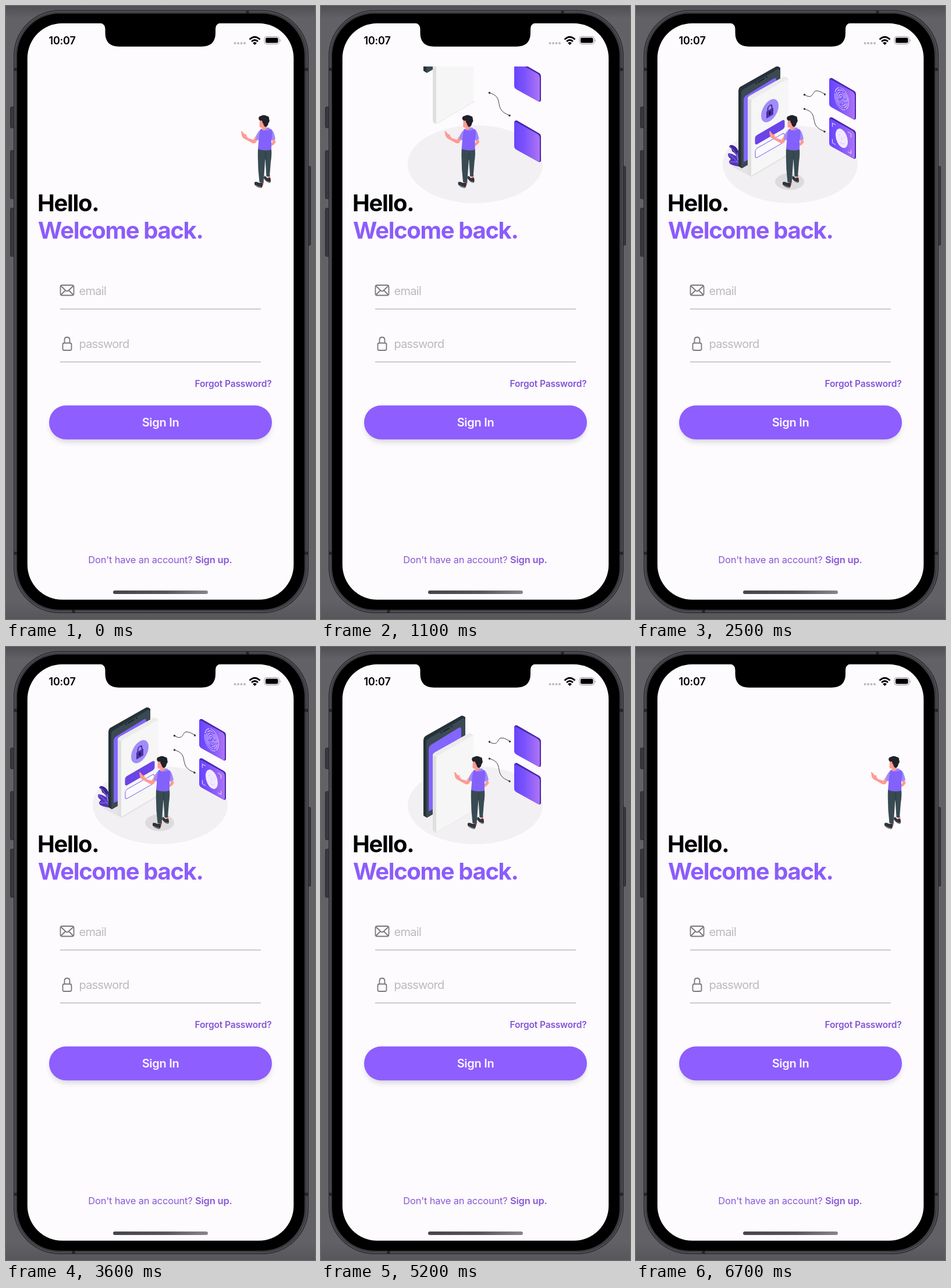
These frames come from a looping animation (531x1054 px, 6800 ms). An HTML page:

```html
<!DOCTYPE html>
<html lang="en">
<head>
<meta charset="utf-8">
<title>Sign in</title>
<style>
  html, body { margin: 0; width: 100%; height: 100%; overflow: hidden; background: #626166; }
  svg { display: block; width: 531px; height: 1054px; }
  text { font-family: Inter, "Open Sans", sans-serif; }
  .line { fill: none; stroke-linecap: round; stroke-linejoin: round; }
  .round { stroke-linejoin: round; stroke-width: 2; }
</style>
</head>
<body>
<svg viewBox="0 0 531 1054">
  <defs>
    <linearGradient id="backdrop" x2="0" y2="1">
      <stop stop-color="#504f53"/><stop offset=".02" stop-color="#626166"/>
      <stop offset=".97" stop-color="#626166"/><stop offset="1" stop-color="#57565a"/>
    </linearGradient>
    <linearGradient id="violet">
      <stop stop-color="#6943ff"/><stop offset=".4" stop-color="#7b53fc"/><stop offset="1" stop-color="#ae74f4"/>
    </linearGradient>
    <linearGradient id="indicator">
      <stop stop-color="#474449"/><stop offset=".55" stop-color="#58555a"/><stop offset="1" stop-color="#89868b"/>
    </linearGradient>
    <filter id="soft" x="-10%" y="-40%" width="120%" height="200%"><feGaussianBlur stdDeviation="5"/></filter>
    <clipPath id="scene"><rect x="37" y="104" width="457" height="250"/></clipPath>
    <path id="cardFace" d="M332 129Q332 125 336 127L372 147Q376 150 376 154V192Q376 196 372 194L336 174Q332 172 332 168Z"/>
    <clipPath id="cardClip"><use href="#cardFace"/></clipPath>
    <clipPath id="panelClip"><path d="M198 160L262 124V255L198 292Z"/></clipPath>
    <g id="card">
      <path d="M332 127Q333 123 337 124L375 146Q378 148 378 152V192Q378 196 374 195L336 174Z" fill="#4728ad"/>
      <use href="#cardFace" fill="url(#violet)"/>
    </g>
  </defs>

  <!-- device -->
  <rect width="531" height="1054" fill="url(#backdrop)"/>
  <g fill="#38373b" stroke="#29282c">
    <rect x="7.500" y="173.500" width="8" height="36" rx="2"/>
    <rect x="7.500" y="248.500" width="8" height="83" rx="2"/>
    <rect x="7.500" y="347.500" width="8" height="83" rx="2"/>
    <rect x="516.500" y="275.500" width="7" height="136" rx="2"/>
  </g>
  <rect x="13.500" y="7.500" width="506" height="1036" rx="78" fill="#3c3b40" stroke="#2a292d"/>
  <rect x="15.500" y="9.500" width="502" height="1032" rx="76" fill="none" stroke="#5d5c62"/>
  <path d="M14 109h6M513 109h6M14 941h6M513 941h6M415 8v5M116 1038v5" stroke="#242327" stroke-width="5"/>
  <rect x="19" y="13" width="494" height="1025" rx="73"/>
  <rect x="36.800" y="29.700" width="457.500" height="991" rx="60" fill="#fdfbfe"/>
  <path d="M162 29Q170.500 31 170.500 40V46Q170.500 69.700 194 69.700H336Q360 69.700 360 46V40Q360 31 368 29Z"/>

  <!-- status bar -->
  <text x="73.500" y="66" font-size="18" font-weight="600" letter-spacing="-.2">10:07</text>
  <g fill="#bbb9bd">
    <circle cx="393.500" cy="64" r="2"/><circle cx="399" cy="64" r="2"/>
    <circle cx="404.500" cy="64" r="2"/><circle cx="410" cy="64" r="2"/>
  </g>
  <path d="M418.500 57.500Q427.500 49 436.500 57.500M422 61Q427.500 56 433 61" fill="none" stroke="#000" stroke-width="2.700"/>
  <path d="M424 63.500Q427.500 60.500 431 63.500L427.500 67Z"/>
  <rect x="444" y="52.500" width="25.500" height="13" rx="4" fill="none" stroke="#98969b"/>
  <rect x="446" y="54.500" width="21.500" height="9" rx="2.300"/>
  <path d="M471 57Q473 59 471 62Z" fill="#98969b"/>

  <!-- illustration -->
  <g clip-path="url(#scene)">
    <ellipse id="floor" cx="265" cy="272" rx="116" ry="67" fill="#f2f0f3"/>
    <g id="shadows" fill="#dddbde">
      <path d="M166 277L181 270L262 250L268 253L199 294Z" fill="#e5e3e6"/>
      <ellipse cx="264" cy="302" rx="25" ry="14.500"/>
    </g>
    <g id="plant">
      <path d="M179 277Q181 252 171 242Q162 236 160 242Q165 245 165 250Q173 252 179 277Z" fill="#3f2599"/>
      <path d="M178 276Q159 274 160 267L163 263Q156 258 159 253Q166 254 172 258L176 250L180 260Z" fill="#5534bd"/>
      <path class="line" d="M162 242Q172 249 177 270M160 255Q172 263 178 274M162 268L174 268M174 253L175 264" stroke="#b9a5ff" stroke-width=".7"/>
    </g>
    <g id="phone">
      <path class="round" d="M177 147Q177 141 181 139L241 105Q244 104 247 107V240L182 278L177 275Z" fill="#263238" stroke="#263238"/>
      <path d="M181 149Q181 145 185 143L243 109Q248 107 248 112V240L181 279Z" fill="#3b4a52"/>
      <path d="M185 162Q185 157 189 154L236 125Q241 122 241 127V245L185 268Z" fill="#8266fd"/>
      <path class="line" d="M210 131L220 125M224 122.500L225 122M206 133L207 132.500" stroke="#17212a" stroke-width="2"/>
    </g>
    <g id="panel">
      <path d="M192 160Q192 156 196 154L253 122Q256 121 259 123Q262 125 262 129V255L199 292Q192 291 192 286Z" fill="#e0dfe0"/>
      <path d="M192 160Q192 156 196 154L253 122Q256 121 259 123L262 126L198 162Z" fill="#ececec"/>
      <path d="M198 166Q198 161 202 159L258 127Q262 125 262 130V251Q262 254 259 256L198 292Z" fill="#f6f6f6"/>
      <g clip-path="url(#panelClip)">
        <g id="lock">
          <circle r="15" transform="matrix(1 -.577 0 1.200 230 180)" fill="#a28cf9"/>
          <g transform="translate(230 181) skewY(-30)">
            <path d="M-3.500-2V-6Q-3.500-10 0-10T3.500-6V-2" fill="none" stroke="#3b2684" stroke-width="1.700"/>
            <rect x="-6" y="-3" width="12" height="12" rx="1" fill="#4a2fa8"/>
            <path d="M0 1V5" stroke="#15103a" stroke-width="2.200" stroke-linecap="round"/>
          </g>
        </g>
        <g id="buttons">
          <rect x="-25.500" y="-8" width="51" height="16" rx="4" transform="translate(230 217) skewY(-30)" fill="#6a44e6"/>
          <rect x="-25" y="-8" width="50" height="16" rx="4" transform="translate(230 240) skewY(-30)" fill="#fbfaff" stroke="#7650ee"/>
        </g>
      </g>
    </g>
    <g id="wireTop">
      <path class="line" d="M289 152.500C302 160 303 152 306 148S316 146 325 152" stroke="#37373c"/>
      <circle cx="289.500" cy="152.500" r="1.700" fill="#37373c"/><circle cx="324.500" cy="152" r="1.700" fill="#37373c"/>
    </g>
    <g id="wireLow">
      <path class="line" d="M289 177C318 184 293 206 325 216" stroke="#37373c"/>
      <circle cx="289.500" cy="177" r="1.700" fill="#37373c"/><circle cx="324" cy="216" r="1.700" fill="#37373c"/>
    </g>
    <g id="cardTop">
      <use href="#card"/>
      <g clip-path="url(#cardClip)"><g id="print" class="line" stroke="#d9cbff"/></g>
    </g>
    <g id="cardLow">
      <use href="#card" y="67.500"/>
      <g clip-path="url(#cardClip)" transform="translate(0 67.500)">
        <g id="face">
          <g transform="translate(353.500 160) skewY(30)">
            <ellipse rx="10.500" ry="15.500" fill="#f1eaff"/>
            <path class="line" d="M-16-11V-17H-11M11-17H16V-11M16 11V17H11M-11 17H-16V11" stroke="#e0d2ff" stroke-width="1.200"/>
            <path class="line" d="M-5-4H-3M4-4H6M0-2V3M-3 8Q1 10 4 7" stroke="#cdb9f3" stroke-width=".8"/>
          </g>
        </g>
      </g>
    </g>
    <g id="man">
      <path d="M282 229L288 231Q290 236 281 241L278 238L283 234Z" fill="#ff9a94"/>
      <path d="M262 302L268 302V307L263 308ZM274 291L279 290V298L275 298Z" fill="#f28f89"/>
      <path d="M258 246L281 246Q282 256 280 268L278 293L272.500 293L270.500 262L267.500 304L260.500 303Q257 275 258 246Z" fill="#394b52"/>
      <path d="M271 250L271 264" stroke="#2b3940"/>
      <path d="M252 303Q255 301 260 304L266 304Q267 310 264 313Q255 312 252 307ZM269 292Q272 293 274 296L279 295Q281 301 279 304Q272 304 268 296Z" fill="#30333a"/>
      <path class="line" d="M253 308Q258 311 264 312M269 298Q273 303 279 303" stroke="#c9c7cc" stroke-width=".8"/>
      <path d="M260 224L255 234Q252 238 247 235L236 229Q231 227 230 222L229 216Q231 215 235 221Q239 219 238 223L241 227L250 230L257 219Z" fill="#ff9a94"/>
      <path class="line" d="M230 216L234 221" stroke="#ff9a94" stroke-width="1.800"/>
      <path d="M262 213Q256 217 254 229Q258 232 262 230ZM280 212Q285 213 288 229Q284 232 279 230Z" fill="#a18afa"/>
      <path d="M262 212Q270 208 281 212Q284 218 281 232V247Q270 250 258 246Q259 234 260 222Z" fill="#8262fb"/>
      <path d="M265 213Q271 216 279 212L277 209L267 209Z" fill="#9c85fd"/>
      <path d="M261 195L260.500 206Q261 210 265 209L265 213Q270 214 273 210L273 198Z" fill="#ff9a94"/>
      <path d="M259.500 195Q258 190 263 189Q268 186 273 189Q278 190 277 194Q279 198 276 201Q275 207 271 208Q268 207 267 202Q265 200 265 197Q261 198 259.500 195Z" fill="#1f2228"/>
    </g>
  </g>

  <!-- form -->
  <g font-size="40" font-weight="700" letter-spacing="-1.350">
    <text x="54" y="352.500">Hello.</text>
    <text x="55" y="400" fill="#8c5cfb">Welcome back.</text>
  </g>
  <g class="line" stroke="#79777c" stroke-width="1.800">
    <rect x="93.500" y="480" width="23" height="17.500" rx="3"/>
    <path d="M95 482L103 489.500Q105 491 107 489.500L115 482M95 496L102 489M115 496L108 489"/>
    <rect x="97.500" y="579.500" width="15" height="12.500" rx="2.500"/>
    <path d="M100.500 579V574Q100.500 569.500 105 569.500T109.500 574V579"/>
  </g>
  <g font-size="20" letter-spacing="-.8" fill="#bcbabf">
    <text x="125.500" y="496.500" letter-spacing="-.7">email</text>
    <text x="125.500" y="587.500">password</text>
  </g>
  <path d="M93 521H438M93 612H438" stroke="#bdbbc0" stroke-width="1.400"/>
  <text x="456.500" y="655" text-anchor="end" font-size="15.500" font-weight="600" letter-spacing="-.15" fill="#8253d8">Forgot Password?</text>
  <rect x="76" y="694" width="379" height="56" rx="28" fill="#000" opacity=".14" filter="url(#soft)"/>
  <rect x="74" y="686.700" width="383" height="58.600" rx="29.300" fill="#8e5eff"/>
  <text x="265.500" y="723" text-anchor="middle" font-size="20" font-weight="600" letter-spacing="-.3" fill="#fbf8ff">Sign In</text>
  <text x="265" y="958" text-anchor="middle" font-size="16.500" letter-spacing="-.2" fill="#8858d6">Don't have an account? <tspan font-weight="600">Sign up.</tspan></text>
  <rect x="184" y="1005" width="163" height="6" rx="3" fill="url(#indicator)"/>
</svg>
<script>
const LOOP = 6800;
const part = id => document.getElementById(id);
const move = (id, x, y) => part(id).setAttribute('transform', `translate(${x} ${y})`);

const ease = (t, start, end) => {
  const x = Math.min(1, Math.max(0, (t - start) / (end - start)));
  return x * x * (3 - 2 * x);
};

// Travels from one offset past the resting place, then settles at zero.
const settle = (t, start, from, over, rest = 700, travel = 600) => {
  const peak = start + travel;
  return t < peak
    ? from + (over - from) * ease(t, start, peak)
    : over * (1 - ease(t, peak, peak + rest));
};

const grow = (id, x, y, scale) =>
  part(id).setAttribute('transform', `translate(${x} ${y}) scale(${scale}) translate(${-x} ${-y})`);

function buildPrint() {
  let ridges = '';
  for (let i = 1; i <= 5; i++) {
    ridges += `<ellipse rx="${i * 2.4}" ry="${i * 3.6}" stroke-dasharray="${8 + i * 5} 3 ${3 + i * 2} 3" stroke-dashoffset="${i * 7}"/>`;
  }
  part('print').innerHTML = `<g transform="translate(353.5 159.5) skewY(28)">${ridges}</g>`;
}

function draw(time) {
  // The second half plays the entrance backwards.
  const t = Math.min(time, LOOP - time);
  move('man', settle(t, 562, 175, -18, 420, 570), 0);
  move('cardLow', 0, settle(t, 600, -180, 20));
  move('cardTop', 0, settle(t, 695, -180, 18));
  move('wireLow', 0, settle(t, 695, -180, 22, 800));
  move('wireTop', 0, settle(t, 800, -180, 13));
  move('panel', 0, settle(t, 780, -240, 33, 800));
  move('phone', 0, settle(t, 884, -240, 15, 900));

  grow('floor', 265, 272, ease(t, 300, 900));
  grow('plant', 179, 277, ease(t, 1700, 2150));
  part('shadows').setAttribute('opacity', ease(t, 1700, 2150));

  const shown = ease(t, 2000, 2500), away = 1 - shown;
  move('lock', 0, -71 * away);
  move('buttons', 0, 88 * away);
  move('print', 52 * away, 0);
  move('face', 55 * away, 0);
  for (const id of ['lock', 'buttons', 'print', 'face']) part(id).setAttribute('opacity', shown);
}

buildPrint();
const began = performance.now();
function tick() {
  draw((performance.now() - began) % LOOP);
  requestAnimationFrame(tick);
}
tick();
</script>
</body>
</html>
```
